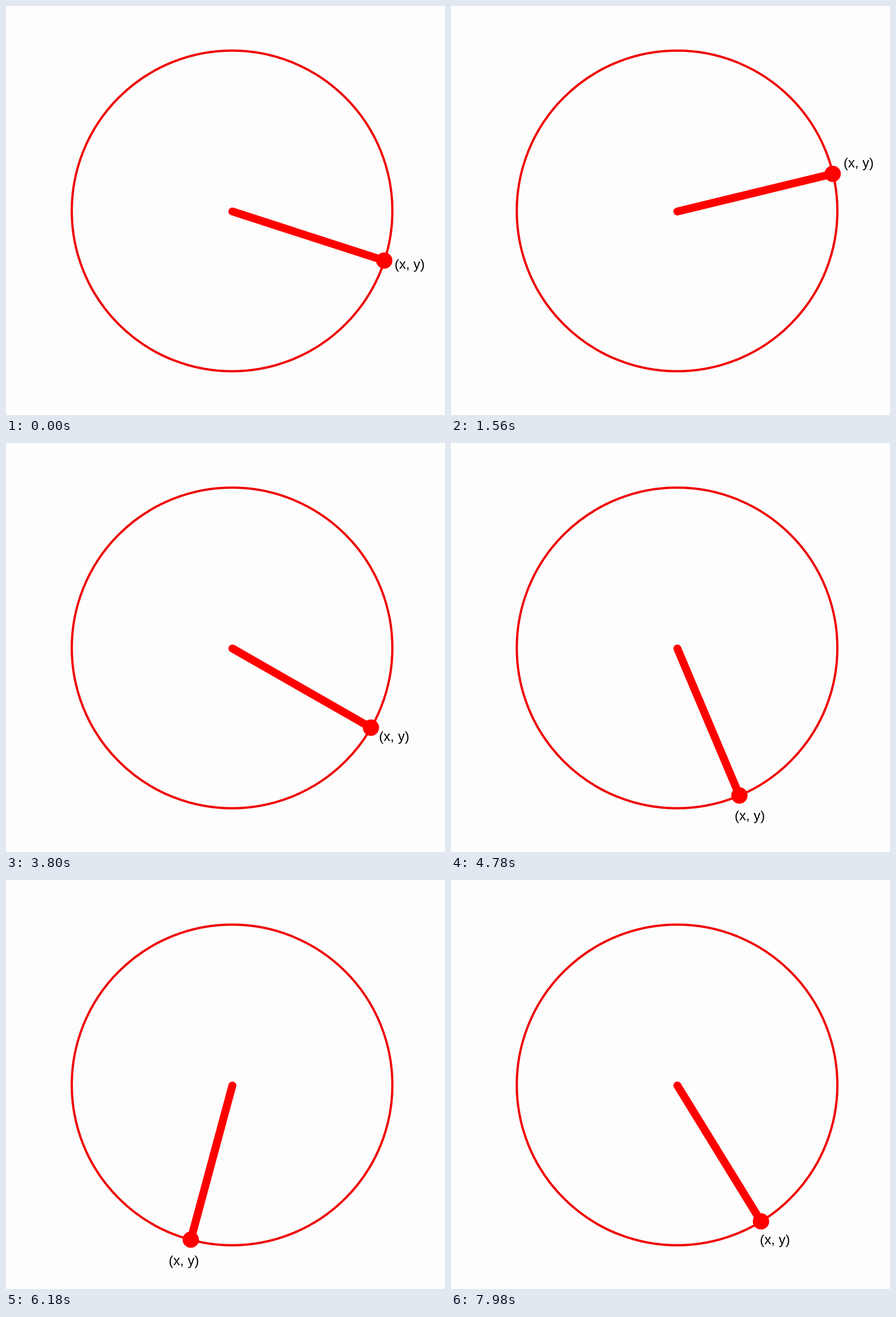
These frames come from a looping animation (775 px wide and 722 px high, 8000 ms). An HTML page:

```html
<!DOCTYPE html>
<html lang="en">
<head>
<meta charset="utf-8">
<title>Point on a circle</title>
<style>
  html, body { margin: 0; width: 100%; height: 100%; overflow: hidden; background: #fdfdfd; }
  svg { display: block; width: 775px; height: 722px; }
  .ring { fill: none; stroke: #f00000; stroke-width: 4; }
  .hand { stroke: #f00; stroke-width: 14; stroke-linecap: round; }
  .dot { fill: #f00; }
  text { font: 24px "Liberation Sans", Arial, sans-serif; text-anchor: middle; fill: #000; }
</style>
</head>
<body>
<svg viewBox="0 0 775 722">
  <circle class="ring" cx="399.1" cy="361.8" r="283"/>
  <line class="hand" x1="399.6" y1="362.7"/>
  <circle class="dot" r="14.4"/>
  <text>(x, y)</text>
</svg>
<script>
const LOOP = 8000;
const CENTER = { x: 399.3, y: 362.2 };
const DOT_RADIUS = 282.3;
const LABEL_RADIUS = 329.5;

// Wandering angle: [step, degrees clockwise from the right]
const path = [
  [0, 18], [17, -6], [34, -13.5], [48, -22], [59, -18.75], [70, 7.2],
  [82, 29.8], [88, 37.5], [103, 67.1], [106, 77], [124, 100],
  [133, 105], [142, 99], [160, 75.2], [171, 58.4]
];

const hand = document.querySelector('.hand');
const dot = document.querySelector('.dot');
const label = document.querySelector('text');

// Steps come in threes, lasting 20, 20 and 100 ms
function stepAt(time) {
  const shifted = time + 20;
  const rest = shifted % 140;
  return 3 * Math.floor(shifted / 140) + (rest < 20 ? 0 : rest < 40 ? 1 : 2) - 1;
}

function slopeAt(i) {
  const [x0, y0] = path[Math.max(i - 1, 0)];
  const [x1, y1] = path[Math.min(i + 1, path.length - 1)];
  return (y1 - y0) / (x1 - x0);
}

// Cubic Hermite curve through the path
function angleAt(step) {
  let i = 0;
  while (i < path.length - 2 && step >= path[i + 1][0]) i++;
  const [x0, y0] = path[i];
  const [x1, y1] = path[i + 1];
  const span = x1 - x0;
  const u = (step - x0) / span;
  const v = 1 - u;
  return y0 * v * v * (1 + 2 * u) + y1 * u * u * (3 - 2 * u)
    + span * u * v * (slopeAt(i) * v - slopeAt(i + 1) * u);
}

function place(element, xName, yName, angle, radius) {
  element.setAttribute(xName, CENTER.x + radius * Math.cos(angle));
  element.setAttribute(yName, CENTER.y + radius * Math.sin(angle));
}

function draw(time) {
  const angle = angleAt(stepAt(time % LOOP)) * Math.PI / 180;
  place(hand, 'x2', 'y2', angle, DOT_RADIUS);
  place(dot, 'cx', 'cy', angle, DOT_RADIUS);
  place(label, 'x', 'y', angle, LABEL_RADIUS);
}

const start = performance.now();
function tick() {
  draw(performance.now() - start);
  requestAnimationFrame(tick);
}
tick();
</script>
</body>
</html>
```
